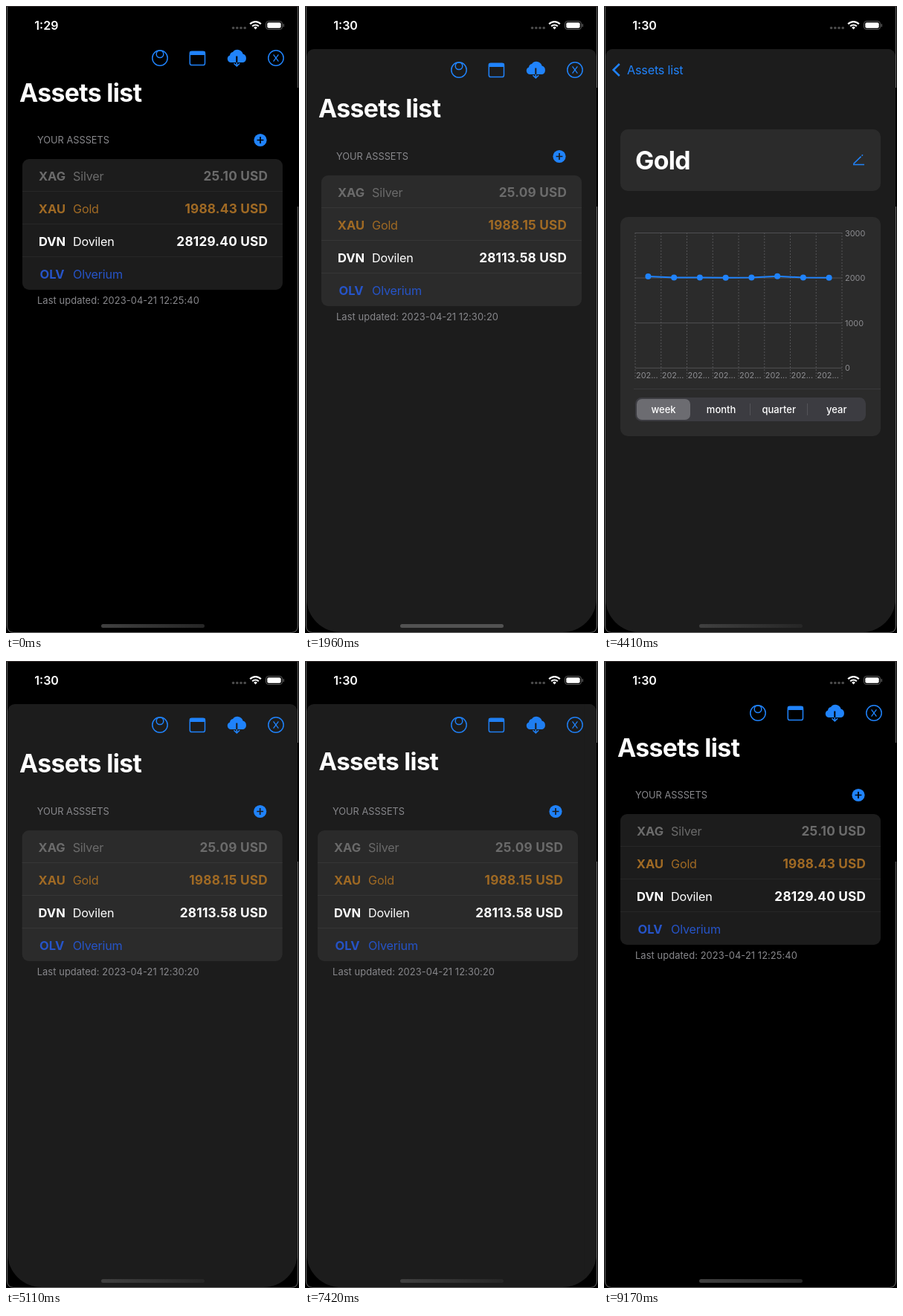
An HTML page that plays this animation: 394 px wide and 844 px high, repeating every 9310 ms.

```html
<!DOCTYPE html>
<html lang="en">
<head>
<meta charset="utf-8">
<title>Assets list</title>
<style>
html, body { margin: 0; width: 100%; height: 100%; overflow: hidden; background: #000; }
svg { display: block; width: 394px; height: 844px; }
text { font-family: Inter, "Liberation Sans", sans-serif; font-optical-sizing: none; white-space: pre; }
.body { font-size: 16.2px; letter-spacing: -.2px; }
.code { font-size: 16.5px; font-weight: 700; text-anchor: middle; }
.value { font-size: 17.2px; font-weight: 700; letter-spacing: .22px; text-anchor: end; }
.head { font-size: 12.8px; fill: #88888c; }
.foot { font-size: 12.9px; letter-spacing: .07px; fill: #88888c; }
.title { font-size: 33.8px; font-weight: 700; letter-spacing: -.65px; fill: #fff; }
.axis { font-size: 10.9px; fill: #8e8e92; }
.seg { font-size: 13px; font-weight: 500; fill: #fff; text-anchor: middle; }
.load { font-size: 24px; fill: #f2f2f2; text-anchor: middle; }
.clock { font-size: 16px; font-weight: 600; fill: #fff; }
</style>
</head>
<body>
<svg id="stage" viewBox="0 0 394 844"></svg>
<script>
const LOOP = 9310, STEP = 70, BLUE = '#2083fb';
const SHEET_TOP = 58, STAGE_H = 844, PAGE_W = 390;

const text = (cls, x, y, str, extra = '') => `<text class="${cls}" x="${x}" y="${y}" ${extra}>${str}</text>`;
const rect = (x, y, w, h, fill, r = 0, extra = '') =>
  `<rect x="${x}" y="${y}" width="${w}" height="${h}" rx="${r}" fill="${fill}" ${extra}/>`;
const line = (x1, y1, x2, y2, color, extra = '') =>
  `<path d="M${x1} ${y1}L${x2} ${y2}" stroke="${color}" fill="none" ${extra}/>`;
const group = (id, body, extra = '') => `<g id="${id}" ${extra}>${body}</g>`;

const ASSETS = [
  ['XAG', 'Silver', '#6b6b6b'],
  ['XAU', 'Gold', '#a06a24'],
  ['DVN', 'Dovilen', '#fff'],
  ['OLV', 'Olverium', '#2654c8']
];

// Toolbar icons, centred on y = 0
const icons = bg => `
  <g fill="none" stroke="${BLUE}" stroke-width="1.5">
    <circle cx="207" cy="0" r="10.2"/><circle cx="207" cy="-5.2" r="4.8"/>
    <rect x="247.3" y="-8.8" width="20.2" height="18.4" rx="2.6"/>
    <circle cx="363" cy="0" r="10.2"/>
    <path d="M359.6 -4.6L366.4 4.6M366.4 -4.6L359.6 4.6" stroke-width="1.3"/>
  </g>
  ${rect(247, -9, 21, 5, BLUE, 1.5)}
  <path d="M302 6a5 5 0 0 1-1-9.6a5 5 0 0 1 4-4.4a7.6 7.6 0 0 1 13.6 2.6a6 6 0 0 1 .4 11.4z" fill="${BLUE}"/>
  ${line(310.3, -2.5, 310.3, 6, bg, 'stroke-width="2"')}
  <path d="M310.3 6V10.6M306.4 7.2L310.3 10.9L314.2 7.2" fill="none" stroke="${BLUE}" stroke-width="1.5"/>`;

// Asset list with the card's top edge at y = 0
function list(id, bg, card, rule, values, stamp) {
  let s = text('head', 42, -21, 'YOUR ASSSETS');
  s += `<circle cx="342" cy="-25.5" r="8.6" fill="${BLUE}"/>
    <path d="M337.6 -25.5h8.8M342 -29.9v8.8" stroke="${bg}" stroke-width="1.7"/>`;
  s += rect(22, 0, 350, 176, card, 9);
  s += rect(22, 0, 350, 44, '#363636', 9, `id="${id}Hit0" visibility="hidden"`);
  s += rect(22, 44, 350, 44, '#363636', 0, `id="${id}Hit1" visibility="hidden"`);
  ASSETS.forEach(([code, name, color], i) => {
    const y = i * 44 + 28.8, fill = `fill="${color}"`;
    if (i) s += line(22, i * 44 - .5, 372, i * 44 - .5, rule);
    s += text('code', 62, y, code, fill) + text('body', 90, y, name, fill);
    s += text('value', 352.2, y, values[i], `${fill} id="${id}Val${i}"`);
  });
  return s + text('foot', 42, 194.5, 'Last updated: ' + stamp, `id="${id}Foot"`);
}

function chart(id, top, points) {
  let s = rect(22, 284, 350, 295, '#2b2b2b', 10);
  for (let i = 0; i < 4; i++) {
    const y = 305.5 + i * 60.6;
    s += line(42, y, 320, y, '#505053') + text('axis', 324, y + 4, top * (3 - i) / 3);
  }
  for (let i = 0; i < 9; i++) {
    const x = 42 + i * 34.75;
    s += line(x, 305, x, 502, '#5a5a5d', 'stroke-width=".9" stroke-dasharray="2 2"');
    if (i < 8) s += text('axis', x + 1, 501, '202...');
  }
  const xy = points.map((v, i) => [59.4 + i * 34.75, 487.3 - v / top * 181.8]);
  s += `<polyline points="${xy.join(' ')}" fill="none" stroke="${BLUE}" stroke-width="2"/>`;
  xy.forEach(([x, y]) => s += `<circle cx="${x}" cy="${y}" r="4" fill="${BLUE}"/>`);
  s += line(40, 515.5, 372, 515.5, '#3a3a3c');
  s += rect(42, 527, 310, 32, '#3c3c41', 8.5) + rect(44, 529, 72, 28, '#6c6c71', 7);
  s += line(196.5, 535, 196.5, 551, '#535358') + line(273.5, 535, 273.5, 551, '#535358');
  ['week', 'month', 'quarter', 'year'].forEach((w, i) => s += text('seg', 80 + i * 77.6, 547.7, w));
  return group(id, s);
}

function loading() {
  let s = rect(22, 284, 350, 172, '#2b2b2b', 10);
  for (let i = 0; i < 8; i++)
    s += `<path id="spoke${i}" d="M0 -10V-17.6" stroke="#fff" stroke-width="4.8" stroke-linecap="round"
      transform="translate(195.5 348.5) rotate(${i * 45})"/>`;
  return group('loading', s + text('load', 196.5, 405.5, 'Loading...'));
}

const detail = () =>
  rect(2, 58, 392, 786, '#1c1c1c') + rect(22, 166, 350, 83, '#2b2b2b', 10) +
  text('title', 42, 219.5, '', 'id="asset"') +
  `<path d="M335 213.5H350M335.5 212.5L345.6 202.6M346.6 201.6l1.4 -1.4" fill="none" stroke="${BLUE}" stroke-width="1.5"/>` +
  loading() +
  chart('goldChart', 3000, [2034, 2008, 2008, 2006, 2008, 2040, 2008, 2007]) +
  chart('silverChart', 30, [25.4, 25.1, 25.1, 25, 25.2, 25.3, 25.1, 25.1]);

const status = () =>
  text('clock', 38.3, 31.5, '', 'id="clock"') +
  [306, 311.2, 316.4, 321.6].map(x => `<circle cx="${x - .4}" cy="29.5" r="1.8" fill="#4b4b4b"/>`).join('') +
  `<g fill="none" stroke="#fff" stroke-width="2.2">
    <path d="M328.2 24.2a10 10 0 0 1 14.6 0M331.2 27.3a6 6 0 0 1 8.6 0"/></g>
   <path d="M335.5 31.5l-2.4 -2.5a3.5 3.5 0 0 1 4.8 0z" fill="#fff"/>` +
  rect(349.5, 20.5, 22, 11, 'none', 3.4, 'stroke="#5e5e5e"') + rect(351.3, 22.3, 18.4, 7.4, '#fff', 2) +
  rect(372.7, 24, 1.3, 4, '#5e5e5e', .6);

const stage = document.getElementById('stage');
stage.innerHTML = `
  <defs>
    <clipPath id="screen"><path d="M2 0H392V797A46 46 0 0 1 346 843H48A46 46 0 0 1 2 797Z"/></clipPath>
    <clipPath id="page"><path d="M2 844V68a10 10 0 0 1 10 -10H382a10 10 0 0 1 10 10V844Z"/></clipPath>
    <linearGradient id="idle"><stop stop-color="#404040"/><stop offset="1" stop-color="#262626"/></linearGradient>
  </defs>
  ${rect(0, 0, 394, 844, '#000')}
  <g clip-path="url(#screen)">
    <g transform="translate(0 70)">${icons('#000')}</g>
    ${text('title', 18, 128.5, 'Assets list')}
    <g transform="translate(0 206)">${list('main', '#000', '#1c1c1c', '#272727',
      ['25.10 USD', '1988.43 USD', '28129.40 USD', ''], '2023-04-21 12:25:40')}</g>
    ${rect(0, 0, 394, 844, '#000', 0, 'id="dim"')}
    ${group('sheet', `<g clip-path="url(#page)">
      ${rect(0, 58, 394, 786, '#1c1c1c')}
      ${group('list', list('sub', '#1c1c1c', '#2b2b2b', '#363636', ['', '', '', ''], ''))}
      ${group('detail', detail())}
      ${group('icons', icons('#1c1c1c'), 'transform="translate(0 86)"')}
      ${group('large', text('title', 0, 0, 'Assets list'))}
      ${group('back', text('body', 0, 0, 'Assets list', `fill="${BLUE}"`))}
      <path id="chevron" d="M20.8 78L12.6 86L20.8 94" fill="none" stroke="${BLUE}" stroke-width="2.5"/>
    </g>`)}
    ${status()}
    ${rect(128, 832, 139, 5, '#3c3c3c', 2.5, 'id="home"')}
  </g>
  <path d="M1.5 0V834Q1.5 843.5 11 843.5H383Q392.5 843.5 392.5 834V0" fill="none" stroke="#686868"/>
  ${line(0, .5, 394, .5, '#332c2c')}
  ${rect(392, 110, 2, 160, '#000')}`;

const el = {};
stage.querySelectorAll('[id]').forEach(n => el[n.id] = n);
const set = (id, name, value) => el[id].setAttribute(name, value);
const show = (id, on) => set(id, 'visibility', on ? 'visible' : 'hidden');
const clamp = v => Math.min(1, Math.max(0, v));
const mix = (a, b, p) => a + (b - a) * p;

// Critically damped spring, normalised to arrive at 1 after `span` ms
const settle = x => 1 - (1 + x) * Math.exp(-x);
const spring = (t, start, rate, span) => {
  const u = clamp((t - start) / span) * span / 1000;
  return settle(rate * u) / settle(rate * span / 1000);
};

const sheetPos = t => t < 8190 ? spring(t, 1270, 10.63, 690) : 1 - spring(t, 8240, 9, 860);

function pushPos(t) {
  if (t < 3500) return 0;
  if (t < 6000) return 1 - spring(t, 4450, 12, 870);
  if (t < 7070) return spring(t, 6100, 14, 620);
  return 1 - spring(t, 7070, 14, 630);
}

function draw(t) {
  const up = sheetPos(t), push = pushPos(t);
  el.clock.textContent = t < 910 ? '1:29' : '1:30';
  set('home', 'fill', t >= 1120 && t < 3500 ? '#525252' : 'url(#idle)');
  set('dim', 'opacity', up * .5);
  set('sheet', 'transform', `translate(0 ${(STAGE_H - SHEET_TOP) * (1 - up)})`);
  show('sheet', up > 0);

  const loaded = t >= 1890;
  ['25.09 USD', '1988.15 USD', '28113.58 USD', ''].forEach((v, i) =>
    el['subVal' + i].textContent = loaded ? v : '...');
  el.subFoot.textContent = 'Last updated: ' + (loaded ? '2023-04-21 12:30:20' : '');
  set('subHit0', 'visibility', t >= 6020 && t < 6160 ? 'inherit' : 'hidden');
  set('subHit1', 'visibility', t >= 2730 && t < 3500 ? 'inherit' : 'hidden');

  set('list', 'transform', `translate(${-.3 * PAGE_W * push} 228)`);
  set('list', 'opacity', 1 - .15 * push);
  set('detail', 'transform', `translate(${PAGE_W * (1 - push)} 0)`);
  set('detail', 'display', push > 0 ? 'inline' : 'none');

  const gold = t < 5700, busy = gold ? t < 3570 : t < 6650;
  el.asset.textContent = gold ? 'Gold' : 'Silver';
  set('loading', 'display', busy ? 'inline' : 'none');
  set('goldChart', 'display', gold && !busy ? 'inline' : 'none');
  set('silverChart', 'display', !gold && !busy ? 'inline' : 'none');
  const lead = (Math.floor(t / 125) + 6) % 8;
  for (let i = 0; i < 8; i++)
    set('spoke' + i, 'opacity', Math.max(.25, .77 - .15 * ((lead - i + 8) % 8)));

  // The large title shrinks into the back label
  const x = mix(18, 31, push), y = mix(149.8, 92, push), width = mix(163, 77, push);
  const fade = clamp((push - .3) / .4);
  set('large', 'transform', `translate(${x} ${y}) scale(${width / 163})`);
  set('back', 'transform', `translate(${x} ${y}) scale(${width / 77})`);
  set('large', 'opacity', 1 - fade);
  set('back', 'opacity', fade);
  set('chevron', 'opacity', clamp((push - .9) * 10));
  set('icons', 'opacity', 1 - push);
}

const begin = performance.now();
function tick() {
  const t = (performance.now() - begin) % LOOP;
  draw(Math.floor(t / STEP) * STEP);
  requestAnimationFrame(tick);
}
tick();
</script>
</body>
</html>
```
